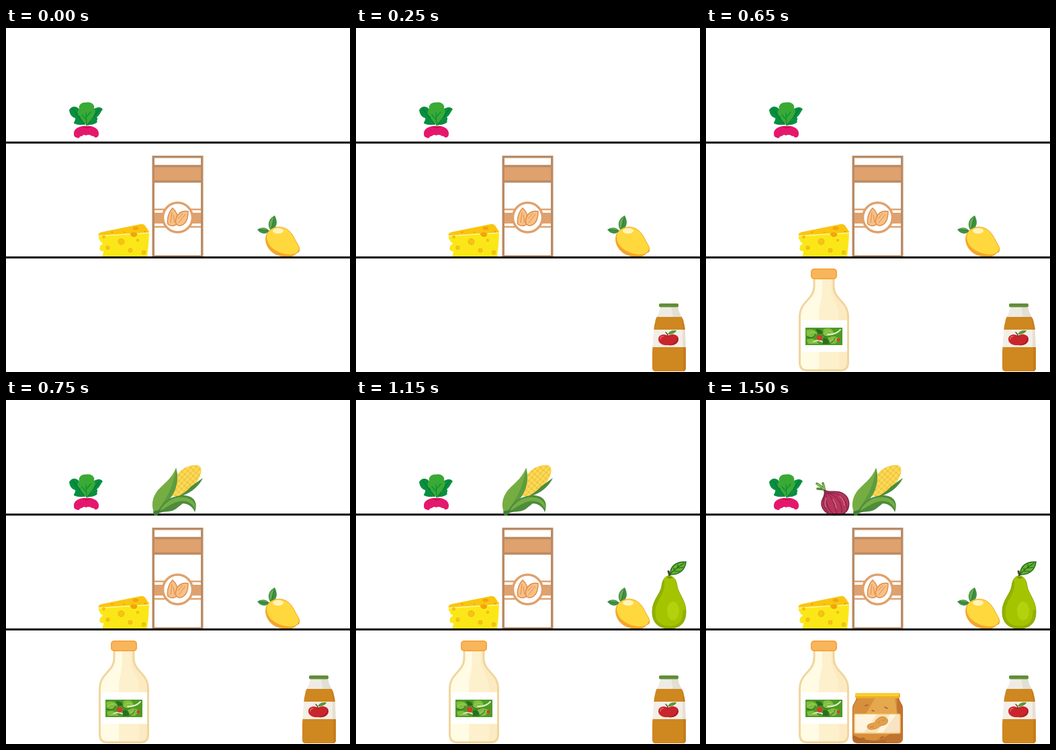
An HTML page that plays this animation: 512x512 px, repeating every 1750 ms.

```html
<!DOCTYPE html>
<html lang="en">
<head>
<meta charset="utf-8">
<title>Filling the shelves</title>
<style>
  html, body { margin: 0; width: 100%; height: 100%; overflow: hidden; background: #fff; }
  svg { display: block; width: 100%; height: 100%; }
  .item { animation: 1750ms step-end infinite; }
  .juice { animation-name: show1; }
  .milk { animation-name: show2; }
  .corn { animation-name: show3; }
  .pear { animation-name: show4; }
  .jar { animation-name: show5; }
  .onion { animation-name: show6; }
  @keyframes show1 { 0% { opacity: 0 } 14.2857%, 100% { opacity: 1 } }
  @keyframes show2 { 0% { opacity: 0 } 28.5714%, 100% { opacity: 1 } }
  @keyframes show3 { 0% { opacity: 0 } 42.8571%, 100% { opacity: 1 } }
  @keyframes show4 { 0% { opacity: 0 } 57.1428%, 100% { opacity: 1 } }
  @keyframes show5 { 0% { opacity: 0 } 71.4285%, 100% { opacity: 1 } }
  @keyframes show6 { 0% { opacity: 0 } 85.7142%, 100% { opacity: 1 } }
  .line { fill: none; stroke-linecap: round; stroke-linejoin: round; }
</style>
</head>
<body>
<svg viewBox="0 0 512 512">
  <defs>
    <pattern id="kernels" width="6.500" height="5.500" patternUnits="userSpaceOnUse" patternTransform="rotate(-48 270 118)">
      <rect width="6.500" height="5.500" fill="#f0c040"/>
      <rect x=".4" y=".4" width="5.700" height="4.700" rx="2" fill="#fbdb55"/>
    </pattern>
    <clipPath id="milkBody">
      <path d="M161 373H190V384C190 405 211 406 211 430V498Q211 509 200 509H150Q140 509 140 498V430C140 406 161 405 161 384Z"/>
    </clipPath>
    <clipPath id="juiceBody">
      <path d="M453 414H479C480 424 485 429 487 435Q490 445 490 455L491 482V506Q491 511 486 511H446Q441 511 441 506V482L443 455Q443 444 446 434C448 428 452 424 453 414Z"/>
    </clipPath>
    <clipPath id="jarBody">
      <path id="jarShape" d="M224 443H287C286 449 292.500 451 292.500 459V503Q292.500 510.500 285 510.500H226Q218.500 510.500 218.500 503V459C218.500 451 225 449 224 443Z"/>
    </clipPath>
    <clipPath id="salad"><rect x="149" y="447" width="53" height="24"/></clipPath>
    <clipPath id="lemonBody">
      <path id="lemonShape" d="M388 307C393 297 406 293 417 299C426 304 429 313 433 320C436 325 438 328 436 333L431 336C427 342 411 341 402 337C389 331 384 317 388 307Z"/>
    </clipPath>
    <clipPath id="pearBody">
      <path id="pearShape" d="M466 262C474 262 477 269 478 277C480 289 491 298 491 315C491 333 481 340 466 340C451 340 441 332 441 315C441 298 453 289 455 277C456 269 459 262 466 262Z"/>
    </clipPath>
  </defs>

  <!-- radish -->
  <g>
    <path fill="#078f40" d="M94 122C98 115 105 116 109 121L118 144C112 144 107 145 101 142C101 139 104 137 103 134C97 132 95 128 94 122ZM144 121C141 116 134 118 130 121L119 145C126 144 132 144 136 140C134 138 138 135 135 133C140 129 140 126 144 121Z"/>
    <path fill="#3aaa35" d="M109 121C107 114 114 110 119 111C126 109 133 114 131 120C136 125 129 130 130 134C128 139 123 139 120 146C117 139 110 138 111 132C105 130 106 123 109 121Z"/>
    <path class="line" stroke="#078f40" stroke-width="1.200" d="M120 144L119 126M119 136L113 129M120 132L126 125"/>
    <path class="line" stroke="#056a35" d="M117 143L100 121M122 143L139 121"/>
    <path fill="#e5176d" d="M101 158C100 149 112 145 120 146C129 145 139 150 138 158C138 161 136 163 133 163C131 163 131 160 128 161C125 158 121 159 119 160C115 157 114 162 111 161L108 164C105 163 101 163 101 158Z"/>
    <path class="line" stroke="#b90f52" stroke-width="1.300" d="M115 147Q120 150 125 147"/>
  </g>

  <g class="item onion">
    <path class="line" stroke="#4f8d39" stroke-width="3.500" d="M181 140L173 130L165 124.500M177 135L174 124M176 133L166 132"/>
    <path class="line" stroke="#9ac45a" stroke-width="1.500" d="M181 140L173 130L165 125M177 134L174 125"/>
    <path fill="#b8355c" stroke="#72203f" stroke-width="1.300" d="M176 134C183 139 195 133 204 139C214 145 214 156 211 163C208 169 200 171.500 191 171.500C178 171 171 161 172 152C173 146 178 143 176 134Z"/>
    <path class="line" stroke="#75203f" d="M178 137C175 148 172 157 182 168M179 138C178 151 180 162 190 170M180 138C189 145 192 160 195 170M181 138C196 143 203 153 202 168M182 138C200 138 209 147 210 162"/>
    <path class="line" stroke="#d4688a" stroke-width="1.500" d="M179 146Q176 153 178 159M189 148Q193 154 194 161M199 143Q206 149 206 157"/>
  </g>

  <!-- carton -->
  <g>
    <path fill="#dfa16d" d="M219 205H292V229H219ZM219 275H292V291H219Z"/>
    <path stroke="#dfa16d" stroke-width="2.500" d="M219 270H292M219 296H292"/>
    <path fill="none" stroke="#ba8b65" stroke-width="3.500" d="M219.250 191.750H291.750V340H219.250ZM219 205.500H292M219 228.500H292"/>
    <circle cx="255.500" cy="282" r="22" fill="#fff" stroke="#dfa16d" stroke-width="3.500"/>
    <g fill="#fac083" stroke="#d98e53" stroke-width="1.500">
      <path d="M248 268C242 274 239 285 241 292C246 296 253 295 256 289C257 282 254 273 248 268Z"/>
      <path d="M271 273C262 271 255 276 253 284C251 290 254 295 260 294C268 292 271 283 271 273Z"/>
      <path fill="none" stroke-width="1" d="M247 274L245 290M249 278L251 290M267 277L257 290M263 276L256 284"/>
    </g>
  </g>

  <!-- cheese -->
  <g>
    <path fill="#fac510" d="M137.500 308C138 304 142 304 146 303L200 292Q204 291 207 294L213 303L211 307L141 311Z"/>
    <path fill="#fbe718" d="M138 309L213 305L212 323L210 340H144C143 337 146 334 145 332C140 333 138 328 140 326C139 323 144 323 144 320C139 319 141 315 138 314Z"/>
    <path class="line" stroke="#fff59a" stroke-width="1.300" d="M139 309.500L184 306.500M196 306L212 305"/>
    <g fill="#f1a40f">
      <ellipse cx="193" cy="298" rx="4.500" ry="2.600"/>
      <ellipse cx="158" cy="304" rx="2" ry="1.200"/>
      <ellipse cx="176" cy="304" rx="1.500" ry="1"/>
      <ellipse cx="207" cy="303" rx="2" ry="1.200"/>
      <path d="M185 306Q190 302 195 306Q196 311 190 311Q186 311 185 306Z"/>
    </g>
    <g fill="#f7c415" stroke="#e9ac12" stroke-width=".8">
      <circle cx="171.500" cy="318" r="4.500"/><circle cx="151.500" cy="327" r="2.700"/>
      <circle cx="185" cy="331" r="3"/><circle cx="205" cy="334" r="2.800"/>
      <circle cx="196" cy="316" r="1.700"/><circle cx="145.500" cy="311" r="2"/>
    </g>
  </g>

  <!-- lemon -->
  <g>
    <path fill="#3f9143" d="M393 300C388 291 392 283 400 279C404 287 405 295 396 301ZM392 302C386 295 379 297 374 300C379 307 387 308 392 302Z"/>
    <path fill="#67ad50" d="M394 299C390 291 393 285 399 281ZM391 301Q383 296 377 300Z"/>
    <path class="line" stroke="#2b743a" d="M395 300L399 283M391 302L377 300"/>
    <use href="#lemonShape" fill="#f6a52c"/>
    <g clip-path="url(#lemonBody)">
      <path fill="#ffd83e" d="M389 306C394 295 410 292 420 300C429 308 430 316 437 326L434 333C429 339 415 338 405 333C392 327 386 317 389 306Z"/>
      <ellipse cx="405" cy="302" rx="8" ry="4" fill="#fff3bd"/>
    </g>
    <use href="#lemonShape" fill="none" stroke="#efaa2d"/>
  </g>

  <g class="item pear">
    <path class="line" stroke="#50401f" stroke-width="3" d="M466.500 264Q467 259 465 255"/>
    <path fill="#65b32e" stroke="#20651f" stroke-width="1.500" d="M468 260C467 248 476 240 491 241C490 253 481 260 468 260Z"/>
    <path class="line" stroke="#20651f" stroke-width="1.200" d="M464 263Q473 252 488 243M474 255L473 250M479 250L479 245M475 255L482 255M480 250L487 249"/>
    <use href="#pearShape" fill="#a5c400"/>
    <g clip-path="url(#pearBody)">
      <path class="line" stroke="#91b100" stroke-width="7" d="M456 272C456 290 442 297 442 315C442 332 451 339 466 340C481 340 490 332 490 315"/>
      <ellipse cx="472" cy="314" rx="9" ry="14" fill="#b3d20d"/>
    </g>
    <use href="#pearShape" fill="none" stroke="#86a800"/>
    <path fill="#719610" d="M462 264Q467 262 471 264Q468 267 462 264Z"/>
  </g>

  <path d="M0 170.500H512M0 341.500H512" stroke="#000" stroke-width="3"/>

  <g class="item corn">
    <path fill="url(#kernels)" d="M245 143L250 119C256 105 269 97 281 97C289 96 292 101 290 109C287 122 273 137 258 143Z"/>
    <path fill="#4d8c3d" d="M293 116C287 130 271 141 257 144L237 160C249 145 264 142 275 129Z"/>
    <path fill="#76ad43" d="M253 101C257 114 255 129 248 141C241 152 231 158 227 168L221 169C216 159 217 147 224 137C232 126 246 119 253 101Z"/>
    <path fill="#5c9c3f" d="M253 101C257 114 255 129 248 141C241 152 231 158 227 168C230 153 248 141 253 101Z"/>
    <path fill="#4d8c3d" d="M224 171C230 153 244 143 262 142C277 141 287 150 281 167C278 158 270 154 263 154L253 162C244 169 234 163 224 171Z"/>
    <path fill="#76ad43" d="M229 165C236 151 252 142 266 145C278 147 283 154 281 162C276 151 266 149 257 151C245 154 238 161 229 165Z"/>
    <path fill="#437d38" d="M219 166L230 163L227 170Q223 174 220 171Z"/>
  </g>

  <g class="item milk">
    <g clip-path="url(#milkBody)">
      <rect x="138" y="370" width="75" height="141" fill="#fdf0cc"/>
      <path fill="#fffbe4" d="M161 372H173V386C173 406 168 412 168 430V511H138V430C140 408 161 405 161 386Z"/>
      <path fill="#fcebc2" d="M186 372H190V386C190 404 211 408 211 430V511H198V430C198 410 186 404 186 386Z"/>
    </g>
    <path class="line" stroke="#f0d69f" stroke-width="3" d="M161 373V384C161 405 139.500 406 139.500 430V498Q139.500 509.500 151 509.500H200Q211.500 509.500 211.500 498V430C211.500 406 190 405 190 384V373"/>
    <path fill="#fff" d="M141 435H210V482H141Z"/>
    <rect x="156" y="358" width="39" height="16" rx="5" fill="#f59f35"/>
    <rect x="157.500" y="359.500" width="36" height="13" rx="4" fill="#f9b55a"/>
    <rect x="148" y="446" width="55" height="26" fill="#4c9b24"/>
    <g clip-path="url(#salad)">
      <path fill="#80bd3f" d="M149 450Q159 446 166 454L158 461L150 458ZM175 448Q188 444 190 454Q183 463 174 457ZM181 461Q191 456 199 463L192 470H184ZM150 464Q162 459 166 470H152Z"/>
      <path fill="#28701f" d="M163 448Q172 447 174 454L167 456ZM174 462Q181 459 184 468L174 471Z"/>
      <path class="line" stroke="#e3ebcb" stroke-width="2" d="M181 456Q193 457 200 449M160 467Q167 463 173 467"/>
      <path class="line" stroke="#a4d369" d="M151 456Q159 449 164 455M156 469Q164 464 167 470M176 455Q181 448 187 453M184 466Q193 460 198 466"/>
      <path class="line" stroke="#245f1e" d="M150 460Q160 464 163 455M170 452Q177 463 185 459M178 470Q188 471 192 462"/>
      <circle cx="169" cy="461" r="4" fill="#d63b2c"/>
      <circle cx="197" cy="464" r="2.500" fill="#d63b2c"/>
    </g>
  </g>

  <g class="item jar">
    <g clip-path="url(#jarBody)">
      <rect x="218" y="442" width="75" height="70" fill="#d78f3c"/>
      <path fill="#e5a84f" d="M252 443H281L284 467H238Z"/>
      <path fill="#c17430" d="M284 443H293V511H232C256 507 282 500 285 480Z"/>
      <path fill="#b4682a" d="M218 498Q238 510 268 506V511H218Z"/>
      <path class="line" stroke="#a95e25" stroke-width="1.500" d="M237 455L241 454M266 457L270 459M247 462L250 463M232 503L236 504M259 503L264 501"/>
    </g>
    <use href="#jarShape" fill="none" stroke="#bd7029" stroke-width="1.200"/>
    <rect x="222" y="436" width="67" height="8" rx="3" fill="#eab021"/>
    <rect x="222" y="436" width="65" height="5" rx="2.500" fill="#fbcc37"/>
    <rect x="221" y="467.500" width="68" height="28.500" rx="2" fill="#f8e4c4" stroke="#f4c56a" stroke-width="1.500"/>
    <path fill="#fff4df" d="M222 468H254L235 495H222ZM274 468H283L263 495H254Z"/>
    <path fill="#e3a04a" stroke="#d18c3c" d="M240 486C241 480 248 483 252 479C254 473 262 469 268 473C273 477 270 483 264 484C258 484 256 490 249 490C245 491 240 490 240 486Z"/>
    <path class="line" stroke="#c47a32" d="M244 487L249 486M256 481L259 478M263 477L266 476"/>
  </g>

  <g class="item juice">
    <g clip-path="url(#juiceBody)">
      <rect x="440" y="413" width="52" height="99" fill="#eeebe4"/>
      <path fill="#e2dfd3" d="M469 414H481L489 431H472Z"/>
      <path fill="#cf871f" d="M440 430H492V449H440ZM440 475H492V512H440Z"/>
      <path fill="#c67c1b" d="M485 430H492V449H487ZM487 475H492V512H487Z"/>
      <path fill="#f3eee6" d="M440 449H492V475H440Z"/>
      <path fill="#e6dfd4" d="M486 449H492V475H486Z"/>
    </g>
    <rect x="451" y="410" width="29" height="5.500" rx="2" fill="#618e38"/>
    <path fill="#c9252c" d="M464 458C458 454 450 457 450 463C450 469 456 473 465 472C474 473 480 469 480 463C480 456 470 454 464 458Z"/>
    <path fill="#a91c27" d="M478 459C483 467 475 474 464 472C473 471 479 467 478 459Z"/>
    <path class="line" stroke="#e86a60" stroke-width="1.500" d="M453 463Q453 459 457 459"/>
    <path class="line" stroke="#573b20" stroke-width="1.500" d="M464 459Q464 455 461 453"/>
    <path fill="#5e9638" d="M464 456C467 450 471 450 477 450C475 455 470 456 464 456Z"/>
  </g>
</svg>
</body>
</html>
```
